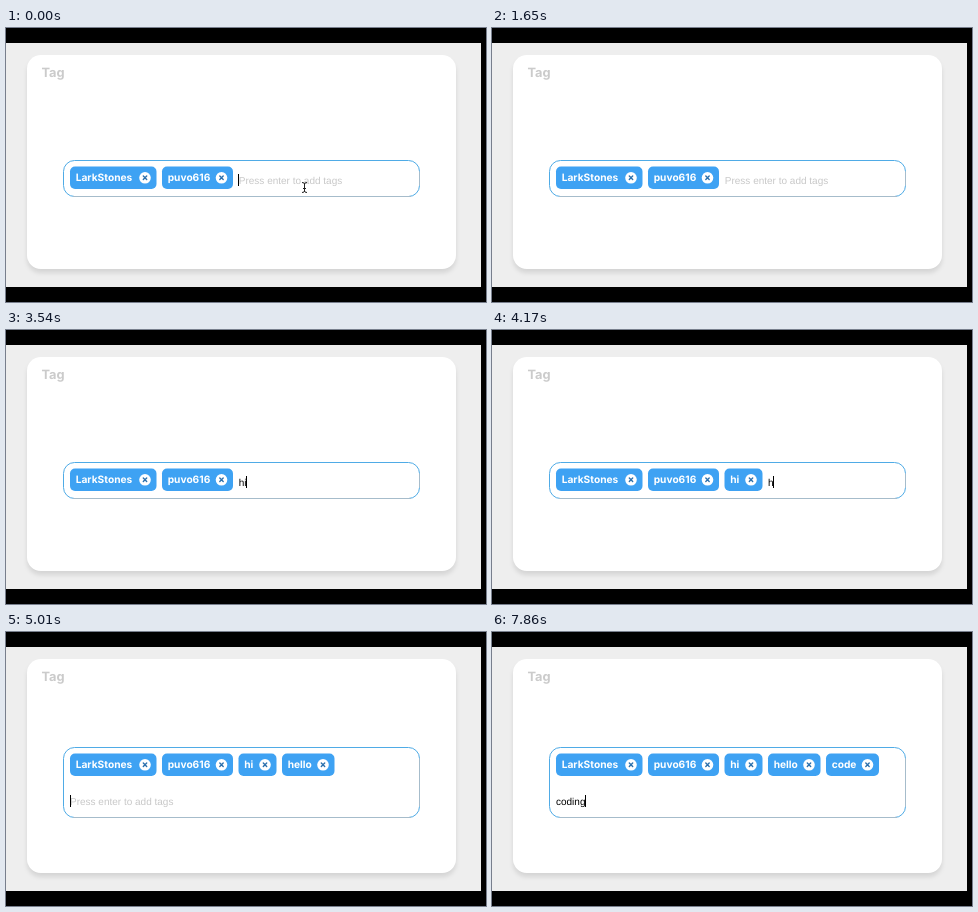
These frames come from a looping animation (480x274 px, 8000 ms). An HTML page:

```html
<!DOCTYPE html>
<html lang="en">
<head>
<meta charset="utf-8">
<title>Tag input</title>
<style>
  html, body { margin: 0; width: 100%; height: 100%; overflow: hidden; background: #000; }
  svg { display: block; width: 480px; height: 274px; }
  text { text-rendering: geometricPrecision; white-space: pre; }
  .title { font: 700 12.8px Inter, sans-serif; fill: #cbcbcb; }
  .tag text { font: 700 10.2px Inter, sans-serif; fill: #fff; }
  .tag rect { fill: #3ea2f3; }
  .tag circle { fill: #fff; }
  .tag path { stroke: #2b70ad; stroke-width: 1.4; stroke-linecap: round; }
  #entry { font: 10px "Liberation Sans", Arial, sans-serif; }
  .card { filter: drop-shadow(0 4px 2px rgba(0, 0, 0, .1)); }
</style>
</head>
<body>
<svg viewBox="0 0 480 274">
  <rect y="15" width="475" height="244" fill="#eee"/>
  <rect class="card" x="21" y="27" width="429" height="214" rx="14" fill="#fff"/>
  <text class="title" x="35.5" y="48.6">Tag</text>
  <rect id="frame" x="57.5" width="356" rx="11" fill="none" stroke="#4fabe6"/>
  <path id="edge" fill="none" stroke="#a6bccb"/>
  <g id="tags"></g>
  <text id="entry"></text>
  <rect id="caret" width="1" height="12"/>
  <path id="mouse" d="M296 154.5q2.5 0 2.5 1.5q0-1.5 2.5-1.5M298.5 156v7.5M296 164.5q2.5 0 2.5-1.5q0 1.5 2.5 1.5M297 160.5h3" fill="none" stroke="#222"/>
</svg>
<script>
const LOOP = 8000, BLINK = 450;
const HINT = 'Press enter to add tags';
const $ = id => document.getElementById(id);

// label, left, width
const TAGS = [
  ['LarkStones', 64, 86.5],
  ['puvo616', 156, 71],
  ['hi', 232.5, 38],
  ['hello', 276, 52.5],
  ['code', 334, 53]
];

// time, tag count, typed text, whether the step restarts the caret blink
const STEPS = [[0, 2, '', true]];
const type = (count, word, times) =>
  times.forEach((t, i) => STEPS.push([t, count, word.slice(0, i + 1), true]));
const enter = (t, count) => STEPS.push([t, count, '', false]);

type(2, '   ', [180, 330, 480]);
enter(660, 2);
STEPS.push([810, 2, '', true]);
type(2, '      ', [1710, 1860, 2010, 2160, 2310, 2460]);
enter(2760, 2);
type(2, 'hi', [3330, 3420]);
enter(3690, 3);
type(3, 'hello', [4170, 4290, 4410, 4530, 4650]);
enter(5010, 4);
type(4, 'code', [5160, 5310, 5430, 5580]);
enter(6180, 5);
type(5, 'coding', [6270, 6480, 7080, 7590, 7710, 7830]);

$('tags').innerHTML = TAGS.map(([label, x, w]) => {
  const cx = x + w - 11.5;
  return `<g class="tag"><rect x="${x}" y="138.5" width="${w}" height="22.5" rx="5"/>
    <text x="${x + 5.7}" y="153.4">${label}</text>
    <circle cx="${cx}" cy="149.8" r="5.8"/>
    <path d="M${cx - 1.7} 148.1l3.4 3.4m0-3.4l-3.4 3.4"/></g>`;
}).join('');
const pills = [...$('tags').children];

const pen = document.createElement('canvas').getContext('2d');
pen.font = '10px "Liberation Sans", Arial, sans-serif';

function set(el, attrs) {
  for (const k in attrs) el.setAttribute(k, attrs[k]);
}

function draw(t) {
  const past = STEPS.filter(s => s[0] <= t);
  const [, count, text] = past[past.length - 1];
  const lastKey = past.filter(s => s[3]).pop()[0];
  const wrap = count > 3;
  const top = wrap ? 115.5 : 132.5, bottom = wrap ? 185.5 : 168.5;
  const x = wrap ? 64 : count === 3 ? 276 : 232.8;
  const dy = wrap ? 17 : 0;

  set($('frame'), { y: top, height: bottom - top });
  set($('edge'), { d: `M67 ${bottom}H405M413.5 ${top + 11}V${bottom - 11}` });
  set($('tags'), { transform: `translate(0 ${-dy})` });
  pills.forEach((p, i) => set(p, { visibility: i < count ? 'visible' : 'hidden' }));

  set($('entry'), { x, y: 155.8 + dy, fill: text ? '#000' : '#c8c8c8' });
  $('entry').textContent = text || HINT;
  set($('caret'), {
    x: Math.floor(x + pen.measureText(text).width),
    y: 146 + dy,
    visibility: (t - lastKey) % (2 * BLINK) < BLINK ? 'visible' : 'hidden'
  });
  set($('mouse'), { visibility: t < 30 ? 'visible' : 'hidden' });
}

const start = performance.now();
function tick(now) {
  draw(Math.max(0, now - start) % LOOP);
  requestAnimationFrame(tick);
}
draw(0);
requestAnimationFrame(tick);
</script>
</body>
</html>
```
